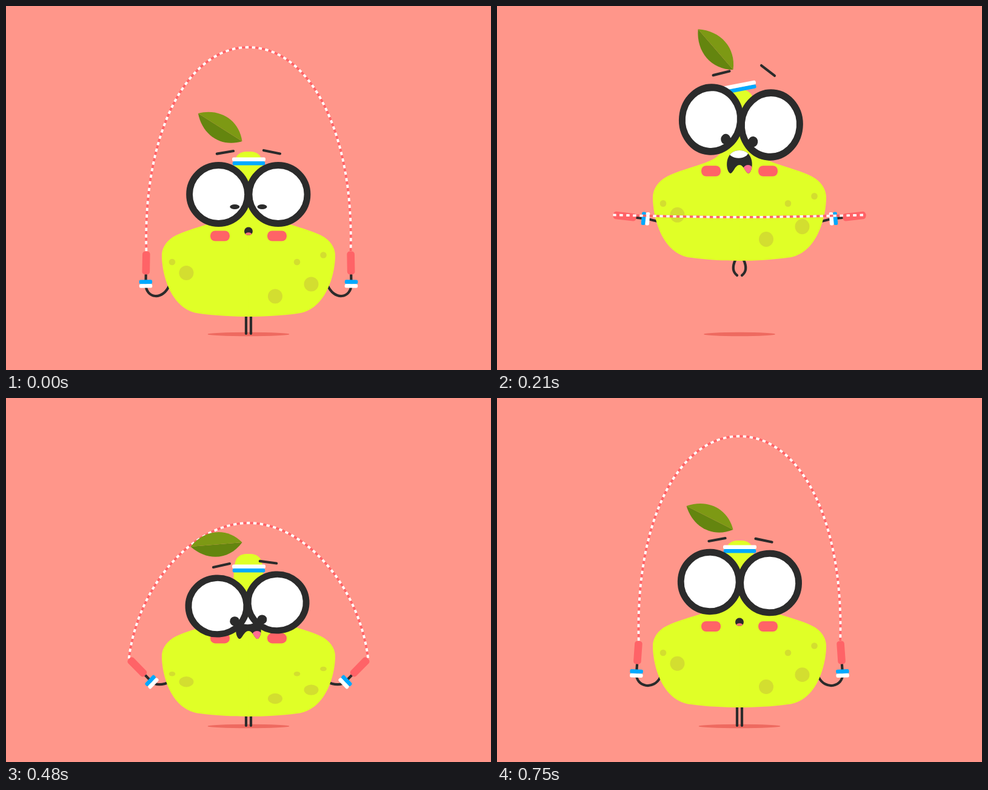
Animation, 800 px wide and 600 px high, one loop 780 ms. Source, as an HTML page with a canvas:

```html
<!DOCTYPE html>
<html lang="en">
<head>
<meta charset="utf-8">
<title>Jumping pear</title>
<style>
html, body { margin: 0; width: 100%; height: 100%; overflow: hidden; background: #ff968a; }
canvas { display: block; width: 800px; height: 600px; }
</style>
</head>
<body>
<canvas id="stage" width="800" height="600"></canvas>
<script>
const g = document.getElementById('stage').getContext('2d');
const LOOP = 780, STEP = 30;
const BG = '#ff968a', DARK = '#2b2b2b', RED = '#ff6367', LIME = '#e0ff27',
      BLUE = '#00a9ff', SPOT = '#d3de30', WHITE = '#fff';

// Pose values at these times; smooth, overshoot-free curves run between them.
const TIMES = [0, 60, 150, 210, 330, 420, 480, 540, 630, 750];
const POSE = {
  base:    [512, 519, 447, 420, 405, 462, 525, 524, 508, 510],
  spotY:   [410.5, 424, 346, 313.5, 296, 358, 446.5, 440, 398, 408.5],
  spotH:   [68, 56, 67.5, 71, 72.5, 70, 49, 56, 75, 67.5],
  head:    [240, 254, 177, 138, 114, 190, 257, 260, 241, 235],
  eyeY:    [310.5, 322, 239, 191.5, 157.5, 260, 340, 334, 306.7, 304],
  eyeA:    [0, -1, 1.75, 5.2, 12.2, 5, -3.5, -3, -0.2, 1.2],
  stretch: [1, 0.97, 1, 1.1, 1.165, 1.1, 0.966, 0.97, 1.005, 1.015],
  browX:   [361.5, 360, 364, 370, 384.5, 366, 355.5, 357, 360.5, 363],
  browLY:  [241.3, 254, 173.5, 110.8, 62, 180, 276, 268, 238.5, 233.5],
  browLA:  [-9.5, 0, 19, -14, -43.6, -20, -12.5, -12, -10.5, -10.2],
  browRY:  [240.7, 254, 170.2, 106.5, 66.5, 178, 270.7, 265, 237.5, 234.7],
  browRA:  [11.5, 5, -3, 37.7, 24.2, 12, 7.4, 9, 10.5, 12],
  leafY:   [223, 236, 153.5, 105, 76, 150, 238, 244, 225, 217],
  leafA:   [32.4, 42, 39.1, 49.1, 57.2, 25, -4.7, 10, 47.4, 26.9],
  bandY:   [256, 270, 185, 134, 89, 178, 281, 276, 257, 249],
  bandA:   [0, 0, -5, -11, -28, -10, 0, 0, 0, 0],
  mouthY:  [371, 383, 296.4, 258, 231.2, 312, 380, 382, 365.5, 369],
  mouthS:  [1, 0.9, 0.84, 1.03, 1.06, 1.05, 0.98, 0.95, 1.04, 1],
  open:    [0, 0.3, 1, 1, 1, 1, 1, 0.6, 0, 0],
  cheekY:  [379, 390, 309.7, 272, 249, 318, 396, 394, 373.7, 376.5],
  foot:    [540, 540, 466, 444, 416.5, 482, 540, 540, 540, 540],
  bend:    [0, 0, 0, 0.5, 1, 0.4, 0, 0, 0, 0],
  shadow:  [67.5, 67.5, 67, 59, 52.5, 58, 67.5, 67.5, 67.5, 67.5],
  wristX:  [230.5, 231, 237, 245, 235.5, 243, 240.5, 237, 234, 230],
  wristY:  [458, 452, 391, 350.5, 318.5, 392, 468, 470, 460, 454],
  tilt:    [1, -6, -28.5, -83.5, -163.5, -100, -44.4, -24, -11.5, 4],
  armOut:  [24, 20, 14, 7, 11, 7, 8.5, 13, 18, 22],
  armSag:  [28, 22, 9, -2, -2, -1, 5, 14, 22, 24],
  armY:    [459, 456, 391, 356, 310, 400, 468, 468, 459, 459],
  rope:    [68, 95, 203, 348, 498, 365, 206, 120, 75, 63]
};

const N = TIMES.length;
const mix = (a, b, k) => a + (b - a) * k;
const rad = a => a * Math.PI / 180;
const span = i => (TIMES[(i + 1) % N] - TIMES[i] + LOOP) % LOOP;

function curve(row, t) {
  let i = N - 1;
  while (TIMES[i] > t) i--;
  const slope = j => (row[(j + 1) % N] - row[j]) / span(j);
  const tangent = j => {
    const a = slope((j + N - 1) % N), b = slope(j % N);
    return a * b > 0 ? 2 * a * b / (a + b) : 0;
  };
  const h = span(i), u = (t - TIMES[i]) / h, v = 1 - u;
  return row[i] * v * v * (1 + 2 * u) + row[(i + 1) % N] * u * u * (3 - 2 * u) +
    h * (tangent(i) * u * v * v - tangent(i + 1) * u * u * v);
}

function poseAt(t) {
  const p = {};
  for (const name in POSE) p[name] = curve(POSE[name], t);
  return p;
}

function fill(color) { g.fillStyle = color; g.fill(); }
function stroke(color, width) { g.strokeStyle = color; g.lineWidth = width; g.stroke(); }
function oval(x, y, rx, ry, color) {
  g.beginPath();
  g.ellipse(x, y, Math.max(rx, 0), Math.max(ry, 0), 0, 0, 7);
  fill(color);
}
function pill(x, y, w, h, r, color) {
  g.beginPath();
  g.roundRect(x - w / 2, y - h / 2, w, h, r);
  fill(color);
}
function at(x, y, angle, draw) {
  g.save();
  g.translate(x, y);
  g.rotate(rad(angle));
  draw();
  g.restore();
}
function bothSides(draw) {
  draw();
  g.save();
  g.translate(800, 0);
  g.scale(-1, 1);
  draw();
  g.restore();
}

function drawRope(p) {
  const x = p.wristX + 54 * Math.sin(rad(p.tilt));
  const y = p.wristY - 54 * Math.cos(rad(p.tilt));
  const drop = p.rope - y, d = Math.abs(drop);
  const x1 = x + 55 - 0.18 * d, y1 = y + drop * (0.43 + 0.0005 * d);
  const x2 = 325 - 0.07 * d;
  g.lineCap = 'butt';
  g.beginPath();
  g.moveTo(x, y);
  g.bezierCurveTo(x1, y1, x2, p.rope, 400, p.rope);
  g.bezierCurveTo(800 - x2, p.rope, 800 - x1, y1, 800 - x, y);
  stroke(RED, 3.6);
  g.setLineDash([5.5, 5.5]);
  stroke(WHITE, 3.8);
  g.setLineDash([]);
  g.lineCap = 'round';
}

function drawArm(p) {
  const dx = Math.sin(rad(p.tilt)), dy = -Math.cos(rad(p.tilt));
  g.beginPath();
  g.moveTo(p.wristX + dx * 15, p.wristY + dy * 15);
  g.lineTo(p.wristX, p.wristY);
  g.bezierCurveTo(p.wristX - dx * p.armOut, p.wristY - dy * p.armOut,
    259, p.armY + p.armSag, 270, p.armY);
  stroke(DARK, 4.2);
  at(p.wristX, p.wristY, p.tilt - 2, () => {
    pill(0, -3.2, 21.5, 6.8, 2.5, BLUE);
    pill(0, 3.4, 21.5, 6.6, 2.5, WHITE);
  });
  at(p.wristX, p.wristY, p.tilt, () => pill(0, -34.5, 12.6, 38, 4.5, RED));
}

function drawLeg(p) {
  const h = p.foot - p.base, out = 14 * Math.pow(p.bend, 0.8);
  g.beginPath();
  g.moveTo(396 - 10.5 * p.bend * p.bend, p.base - 2);
  g.bezierCurveTo(396 - out, p.base + h * 0.4,
    396 - out, p.base + h * (0.5 + p.bend / 2), 396, p.foot);
  stroke(DARK, 4.2);
}

function drawBody(p) {
  const k = 1 + 0.37 * (p.stretch - 1);
  const y = h => p.base - h * k;
  bothSides(() => {
    g.beginPath();
    g.moveTo(400.5, p.head);
    g.lineTo(397, p.head);
    g.bezierCurveTo(387, p.head, 380, p.head + 5, 378, p.head + 14);
    g.bezierCurveTo(375, p.head + 25, 375, y(215), 375, y(192));
    g.bezierCurveTo(375, y(166), 355, y(160), 335, y(153));
    g.bezierCurveTo(310, y(145), 290, y(140), 275, y(131));
    g.bezierCurveTo(262, y(122), 257, y(111), 257, y(101));
    g.bezierCurveTo(257, y(70), 272, y(10), 320, y(5));
    g.bezierCurveTo(345, y(1.5), 375, y(0), 400.5, y(0));
    fill(LIME);
  });
  const s = p.spotH / 68;
  const spot = (x, dy, r) => oval(x, p.spotY + dy * s, r, r * s, SPOT);
  spot(274, 11.5, 5.3);
  spot(480, 11.5, 5.3);
  spot(523.5, 0, 5.3);
  spot(297.5, 29.5, 12);
  spot(503.5, 48, 12);
  spot(444, 68, 12);
  bothSides(() => pill(353, p.cheekY, 32, 17 * k, 8, RED));
}

const SMALL = [-4.5, 5.5, -9, 2, -7, -6.5, 0, -6.5, -2, 6.5, -3, 6.8];
const WIDE = [-16, 17, -24, 10, -24, -19.5, 0, -19.5, -8, 4, -11, 20];

function drawMouth(p) {
  const o = p.open, m = SMALL.map((v, i) => mix(v, WIDE[i], o));
  g.save();
  g.translate(400, p.mouthY);
  g.scale(1, p.mouthS);
  g.beginPath();
  g.moveTo(m[0], m[1]);
  g.bezierCurveTo(m[2], m[3], m[4], m[5], m[6], m[7]);
  g.bezierCurveTo(-m[4], m[5], -m[2], m[3], -m[0], m[1]);
  const notch = mix(6.5, 4, o);
  g.bezierCurveTo(-m[10], m[11], -m[8], m[9], 0, notch);
  g.bezierCurveTo(m[8], m[9], m[10], m[11], m[0], m[1]);
  fill(DARK);
  g.clip();
  oval(14 * o, mix(6, 11, o), mix(5.5, 8, o), mix(3.8, 7, o), o > 0.3 ? '#ff6c92' : '#ff7478');
  if (o > 0) oval(-1.5 * o, -17 * o - 6 * (1 - o), 16 * o, 10 * o, WHITE);
  g.restore();
}

function drawGlasses(p, blink) {
  at(399.8 + p.eyeA / 2, p.eyeY, p.eyeA, () => {
    g.scale(1, p.stretch);
    for (const x of [-49.2, 49.2]) {
      g.beginPath();
      g.arc(x, 0, 48, 0, 7);
      fill(WHITE);
      stroke(DARK, 10.8);
    }
    if (blink > 0)
      for (const x of [-22.5, 22.7]) oval(x, 13.5 + 14 * blink, 8, 8 * blink, DARK);
  });
}

function drawLeaf(p) {
  const len = 86 * (1 + 0.28 * (p.stretch - 1));
  at(389.5, p.leafY, p.leafA, () => {
    for (const [side, color] of [[27, '#64850f'], [-27, '#7d9914']]) {
      g.beginPath();
      g.moveTo(0, 0);
      g.bezierCurveTo(-len * 0.27, side, -len * 0.7, side, -len, 0);
      g.closePath();
      fill(color);
    }
  });
}

function drawBrow(x, y, angle) {
  at(x, y, angle, () => {
    g.beginPath();
    g.moveTo(-13.8, 0);
    g.lineTo(13.8, 0);
    stroke(DARK, 4.2);
  });
}

function draw(t) {
  const p = poseAt(t), front = t < 350;
  const away = Math.abs(t - 750);
  const blink = Math.min(1, Math.min(away, LOOP - away) / 60);
  g.lineCap = 'round';
  g.fillStyle = BG;
  g.fillRect(0, 0, 800, 600);
  oval(400, 541, p.shadow, 3.3, '#ee6a60');
  if (!front) drawRope(p);
  bothSides(() => { drawLeg(p); drawArm(p); });
  drawBody(p);
  drawMouth(p);
  at(400.5, p.bandY, p.bandA, () => {
    pill(0, 3.2, 53.5, 6.6, 2.5, BLUE);
    pill(0, -3.3, 55, 6.6, 2.5, WHITE);
  });
  drawGlasses(p, blink);
  drawLeaf(p);
  drawBrow(p.browX, p.browLY, p.browLA);
  drawBrow(p.browX + 77, p.browRY, p.browRA);
  if (front) drawRope(p);
}

function tick() {
  draw(Math.floor(performance.now() % LOOP / STEP) * STEP);
  requestAnimationFrame(tick);
}
tick();
</script>
</body>
</html>
```
